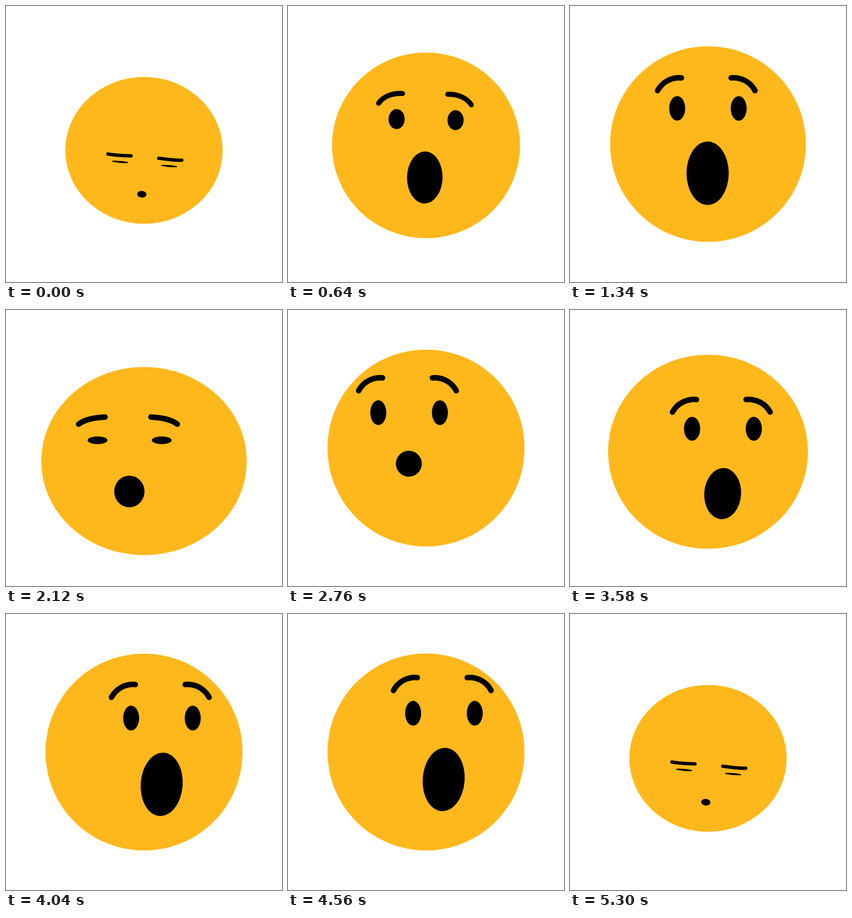
These frames come from a looping animation (500 by 500 pixels, 5340 ms). An HTML page with a canvas:

```html
<!DOCTYPE html>
<html lang="en">
<head>
<meta charset="utf-8">
<title>Surprised face</title>
<style>
  html, body { margin: 0; width: 100%; height: 100%; overflow: hidden; background: #fff; }
  canvas { display: block; width: 500px; height: 500px; }
</style>
</head>
<body>
<canvas id="stage"></canvas>
<script>
const LOOP = 5340, STEP = 20;
const canvas = document.getElementById('stage');
const ctx = canvas.getContext('2d');
const ratio = window.devicePixelRatio || 1;
canvas.width = canvas.height = 500 * ratio;
ctx.scale(ratio, ratio);

// Poses: features are placed relative to the point between the eyes (x, y).
const asleep = {
  headRx: 142.5, headRy: 133, headY: 261.5, x: 251.2, y: 286.2, turn: 4.85,
  eyeGap: 44.4, eyeRx: 15, eyeRy: 1.8,
  browX: -0.7, browY: -12.5, browGap: 46.2, browLen: 21, browWidth: 6, arch: 0, bulge: -1,
  mouthY: 55, mouthRx: 8.4, mouthRy: 6, mouthTurn: 0
};
const front = {
  headRx: 177.7, headRy: 177.6, headY: 250, x: 249.9, y: 184.6, turn: 0,
  eyeGap: 55.8, eyeRx: 14.5, eyeRy: 22.5,
  browX: -3, browY: -44, browGap: 66.8, browLen: 21.6, browWidth: 10, arch: 23.3, bulge: 11.4,
  mouthY: 118, mouthRx: 38.5, mouthRy: 58, mouthTurn: 0
};
const left = {
  ...front, headRx: 178.5, headRy: 178.4, x: 219.4, y: 181.5,
  browY: -52.7, mouthY: 92.5, mouthRx: 23.5, mouthRy: 23.5
};
const right = {
  ...left, x: 282.5, y: 184.5, browY: -50.5,
  mouthY: 120, mouthRx: 38, mouthRy: 57.5, mouthTurn: 4
};

// What each movement adds to the pose at full strength.
const drop = { headY: 36 };
const squash = { headRx: 9.7, headRy: -9.8 };
const sag = { y: 65, browY: 19 };
const blink = {
  eyeRx: 4, eyeRy: -18, eyeGap: 2.7, browGap: -1.5, browLen: 2.7,
  arch: -12, bulge: -7.5, mouthY: -4, mouthRx: 2
};
const lift = { y: -8.9, browY: -4.6 };

const BOUNCES = [1640, 2902], RISE = 350;

const mix = (a, b, k) => a + (b - a) * k;
const fade = u => Math.exp(-Math.pow(Math.max(0, u), 1.5));
const rad = deg => deg * Math.PI / 180;

function ease(t, from, to) {
  const u = Math.min(1, Math.max(0, (t - from) / (to - from)));
  return u * u * (3 - 2 * u);
}

// Rises on each bounce, then dies away.
function pulse(t, delay, fall) {
  return BOUNCES.reduce((sum, at) => {
    const start = at + delay, peak = start + RISE;
    return sum + ease(t, start, peak) * fade((t - peak) / fall);
  }, 0);
}

function poseAt(t) {
  const toLeft = ease(t, 1640, 2275);
  const toRight = ease(t, 2900, 3730);
  const mouthOpen = ease(t, 2900, 4000);
  const awake = (1 - fade(t / 475)) * (1 - ease(t, 4860, 5300));
  const moves = [
    [drop, pulse(t, 0, 233)],
    [squash, pulse(t, 45, 233)],
    [sag, pulse(t, 0, 400)],
    [blink, pulse(t, 100, 108)],
    [lift, ease(t, 4200, 4880)]
  ];
  const p = {};
  for (const key in front) {
    const k = key === 'mouthRx' || key === 'mouthRy' ? mouthOpen : toRight;
    let v = mix(mix(front[key], left[key], toLeft), right[key], k);
    for (const [move, amount] of moves) v += (move[key] || 0) * amount;
    p[key] = mix(asleep[key], v, awake);
  }
  return p;
}

function oval(x, y, rx, ry, turn = 0) {
  ctx.beginPath();
  ctx.ellipse(x, y, rx, ry, rad(turn), 0, Math.PI * 2);
  ctx.fill();
}

function brow(p, side) {
  const L = p.browLen, a = p.arch;
  const chord = x => -a * x / 2;
  ctx.save();
  ctx.translate(p.browX + side * p.browGap, p.browY);
  ctx.scale(-side, 1);
  ctx.beginPath();
  ctx.moveTo(-L, chord(-1));
  ctx.bezierCurveTo(-0.62 * L, chord(-0.62) - p.bulge, 0.15 * L, chord(0.15) - p.bulge, L, chord(1));
  ctx.stroke();
  ctx.restore();
}

function draw(t) {
  const p = poseAt(t);
  ctx.fillStyle = '#fff';
  ctx.fillRect(0, 0, 500, 500);
  ctx.fillStyle = '#ffb81c';
  oval(250, p.headY, p.headRx, p.headRy);

  ctx.save();
  ctx.translate(p.x, p.y);
  ctx.rotate(rad(p.turn));
  ctx.fillStyle = ctx.strokeStyle = '#000';
  ctx.lineWidth = p.browWidth;
  ctx.lineCap = 'round';
  for (const side of [-1, 1]) {
    brow(p, side);
    oval(side * p.eyeGap, 0, p.eyeRx, p.eyeRy);
  }
  oval(-0.5, p.mouthY, p.mouthRx, p.mouthRy, p.mouthTurn);
  ctx.restore();
}

const start = performance.now();
function tick() {
  const t = (performance.now() - start) % LOOP;
  draw(Math.floor(t / STEP) * STEP);
  requestAnimationFrame(tick);
}
tick();
</script>
</body>
</html>
```
